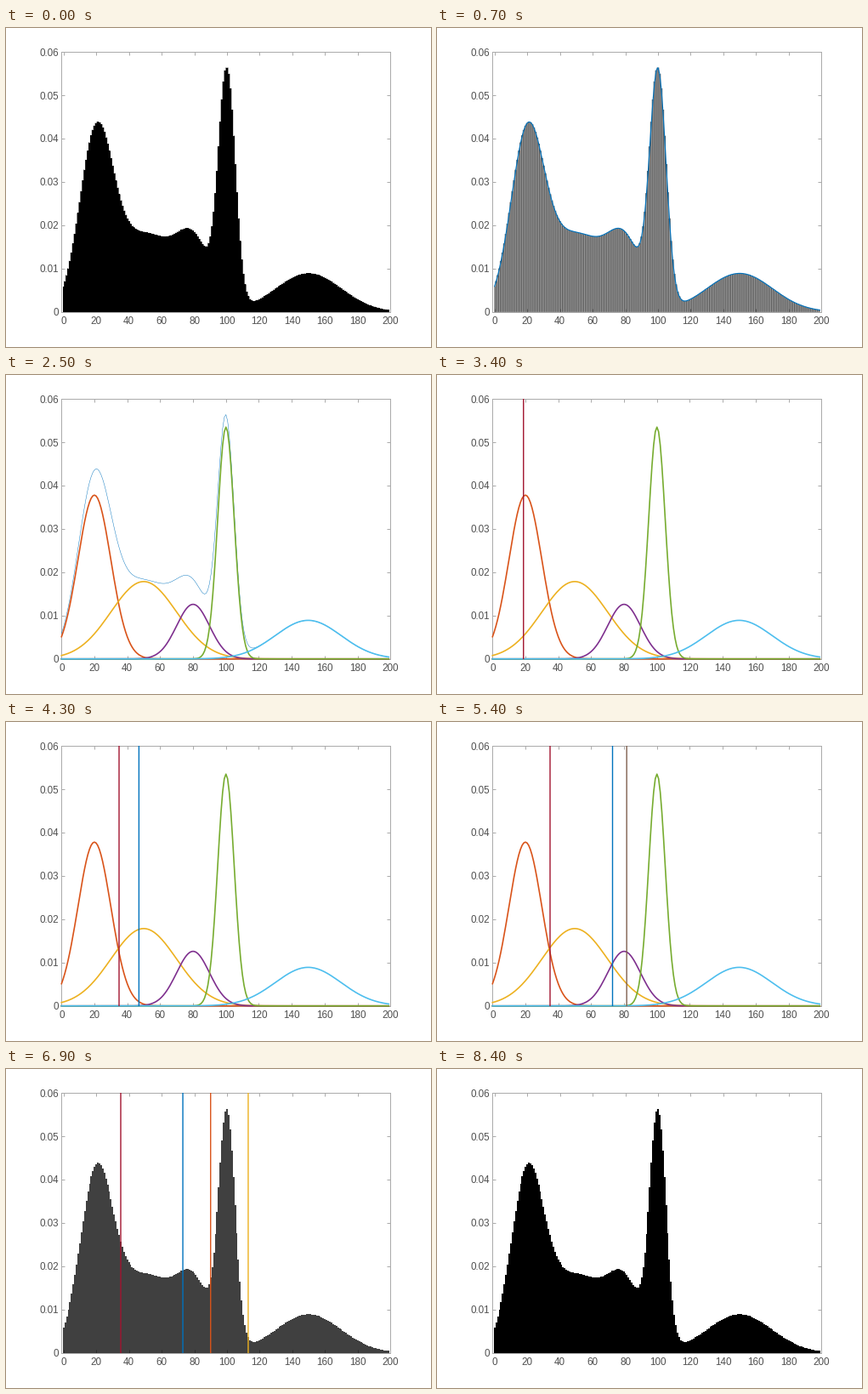
A matplotlib script that plays this animation: 500x375 px, repeating every 9200 ms.

```python
import numpy as np
import matplotlib.pyplot as plt
from matplotlib.animation import FuncAnimation

PX = 0.72  # points per pixel at 100 dpi
BLUE, ORANGE, YELLOW, PURPLE, GREEN, CYAN, CRIMSON = (
    "#0072bd", "#d95319", "#edb120", "#7e2f8e", "#77ac30", "#4dbeee", "#a2142f")
BROWN = "#80604f"
FRAME_GRAY, LABEL_GRAY = "#ababab", "#505050"
CURVE_WIDTH = 1.65

plt.rcParams.update({"font.family": "Liberation Sans", "font.size": 11.6 * PX})

# peak height, mean, standard deviation, colour
PARTS = [(0.0378, 20, 10, ORANGE), (0.01785, 50, 20, YELLOW),
         (0.0126, 80, 10, PURPLE), (0.0535, 100, 5, GREEN),
         (0.0089, 150, 20, CYAN)]
THRESHOLDS = np.array([35, 73, 90, 113])
SPREAD = np.array([20, 76, 133, 189.5])
SPREAD_WEIGHTS = {78: 1 / 3, 79: 2 / 3, 80: 1, 81: 0.5}

x = np.arange(200)
curves = [h * np.exp(-((x - m) ** 2) / (2 * s * s)) for h, m, s, _ in PARTS]
total = np.sum(curves, axis=0)

fig = plt.figure(figsize=(5, 3.75), dpi=100, facecolor="white")
ax = fig.add_axes([65.3 / 500, 0.11, 386.9 / 500, 0.815])
ax.set_ylim(0, 0.06)
ax.set_xticks(range(0, 201, 20))
ax.set_yticks(np.arange(7) / 100, ["0"] + [f"0.0{i}" for i in range(1, 7)])
ax.set_axisbelow(True)
ax.tick_params(direction="in", top=True, right=True, length=4 * PX,
               width=PX, color=FRAME_GRAY, labelcolor=LABEL_GRAY)
ax.tick_params(axis="x", pad=5 * PX)
ax.tick_params(axis="y", pad=3.4 * PX)
for spine in ax.spines.values():
    spine.set(linewidth=PX, color=FRAME_GRAY, zorder=1)

bars = ax.stairs(total, np.arange(201) - 0.5, fill=True, color="black",
                 linewidth=0, zorder=2)
edge_tops = np.maximum(total[1:], total[:-1])
edges = ax.vlines(x[1:] - 0.5, 0, edge_tops, color="black",
                  linewidth=PX, zorder=2.1)
edges.set_snap(False)


def curve(y, color):
    return ax.plot(x, y, color=color, clip_on=False, zorder=3)[0]


total_line = curve(total, BLUE)
part_lines = [curve(y, p[3]) for y, p in zip(curves, PARTS)]
markers = [ax.plot([0, 0], [0, 0.06], color=c, linewidth=1.4 * PX,
                   snap=False, zorder=4)[0]
           for c in (CRIMSON, BLUE, ORANGE, YELLOW)]


def set_width(line, fraction):
    line.set_visible(fraction > 0.01)
    line.set_linewidth(CURVE_WIDTH * fraction * PX)


def ramp(n, start, end):
    return float(np.clip((n - start) / (end - start), 0, 1))


def marker_state(n):
    """Position of every threshold line, NaN where it is hidden."""
    if n < 28 or n >= 84:
        return np.full(4, np.nan)
    if n < 65:
        sweep = 113 * ramp(n, 28, 64)
        starts = np.r_[0, THRESHOLDS[:-1]]
        return np.where(sweep >= starts, np.minimum(sweep, THRESHOLDS), np.nan)
    w = SPREAD_WEIGHTS.get(n, 0)
    return THRESHOLDS * (1 - w) + SPREAD * w


def update(n):
    curve_mode = 16 <= n < 65
    ax.set_xlim(0 if curve_mode else -1.25, 200)

    fading_out = n < 16
    alpha = 1 - n / 16 if fading_out else 1 - max(0, 71 - n) / 8
    bars.set_visible(not curve_mode)
    edges.set_visible(fading_out)
    if not curve_mode:
        bars.set_alpha(alpha ** 2 if fading_out else alpha)
        edges.set_alpha(alpha if fading_out else 0)

    if n < 18:
        set_width(total_line, ramp(n, 0, 10))
    else:
        set_width(total_line, 1 - ramp(n, 17, 28))
    for line in part_lines:
        set_width(line, ramp(n, 17, 25) if curve_mode else 0)

    for line, pos in zip(markers, marker_state(n)):
        line.set_visible(not np.isnan(pos))
        line.set_xdata([pos, pos])
    markers[2].set_color(BROWN if curve_mode else ORANGE)
    return []


anim = FuncAnimation(fig, update, frames=92, interval=100,
                     repeat=True, repeat_delay=0, blit=False)
plt.show()
```
